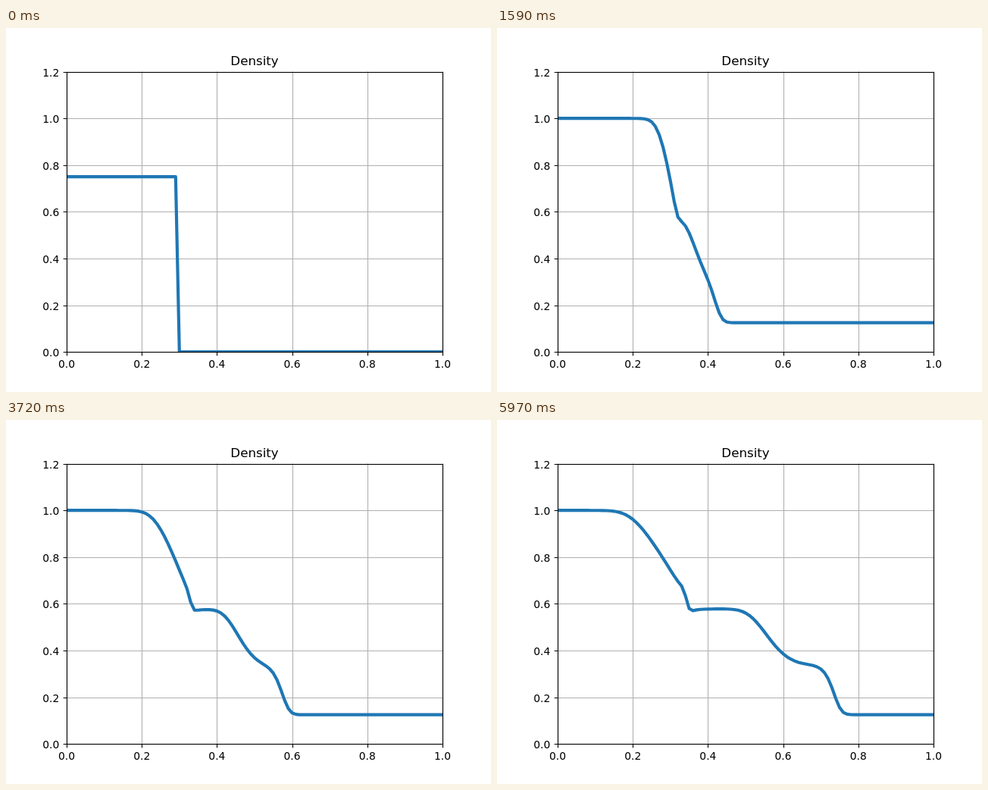
These frames come from a looping animation (640x480 px, 6000 ms). An HTML page:

```html
<!DOCTYPE html>
<html lang="en">
<head>
<meta charset="utf-8">
<title>Density</title>
<style>
  html, body { margin: 0; width: 100%; height: 100%; overflow: hidden; background: #fff; }
  svg { display: block; width: 640px; height: 480px; }
  text { font: 13.889px "DejaVu Sans", sans-serif; fill: #000; }
  #title { font-size: 16.667px; text-anchor: middle; }
</style>
</head>
<body>
<svg viewBox="0 0 640 480">
  <defs><clipPath id="area"><rect x="80" y="57.6" width="496" height="369.6"/></clipPath></defs>
  <rect width="640" height="480" fill="#fff"/>
  <path id="grid" fill="none" stroke="#b0b0b0" stroke-width="1.11"/>
  <path id="ticks" fill="none" stroke="#000" stroke-width="1.11"/>
  <path id="curve" fill="none" stroke="#1f77b4" stroke-width="4.167"
        stroke-linejoin="round" stroke-linecap="square" clip-path="url(#area)"/>
  <rect x="80.5" y="58.5" width="496" height="369" fill="none" stroke="#000" stroke-width="1.11"/>
  <g id="labels"></g>
  <text id="title" x="328" y="49">Density</text>
</svg>
<script>
const FRAMES = 200, FRAME_MS = 30;
const CELLS = 101, DX = 0.01, DT = 0.001, GAMMA = 1.4;
const byId = id => document.getElementById(id);
const px = x => 80 + 496 * x;
const py = y => 427.2 - 308 * y;
const snap = v => Math.floor(v + 0.5) + 0.5;

function drawAxes() {
  let grid = '', ticks = '', labels = '';
  for (let i = 0; i <= 6; i++) {
    const v = i / 5, y = snap(py(v));
    grid += `M80 ${y}H576`;
    ticks += `M80.5 ${y}h-4.86`;
    labels += `<text x="70.3" y="${y + 5}" text-anchor="end">${v.toFixed(1)}</text>`;
    if (i > 5) continue;
    const x = snap(px(v));
    grid += `M${x} 57.6V427.2`;
    ticks += `M${x} 427.5v4.86`;
    labels += `<text x="${px(v)}" y="448" text-anchor="middle">${v.toFixed(1)}</text>`;
  }
  byId('grid').setAttribute('d', grid);
  byId('ticks').setAttribute('d', ticks);
  byId('labels').innerHTML = labels;
}

// Shock tube: conserved state is [density, momentum, energy].
const conserved = (rho, u, p) => [rho, rho * u, p / (GAMMA - 1) + rho * u * u / 2];

function describe(state) {
  const [rho, mom, energy] = state;
  const u = mom / rho;
  const p = (GAMMA - 1) * (energy - mom * u / 2);
  const a = Math.sqrt(GAMMA * p / rho);
  return { state, flux: [mom, mom * u + p, u * (energy + p)], slow: u - a, fast: u + a };
}

// Two-wave flux, applied everywhere, also where both waves run the same way.
function faceFlux(l, r) {
  const sl = Math.min(l.slow, r.slow), sr = Math.max(l.fast, r.fast);
  return l.flux.map((f, k) =>
    (sr * f - sl * r.flux[k] + sl * sr * (r.state[k] - l.state[k])) / (sr - sl));
}

function advance(cells) {
  const info = cells.map(describe);
  const faces = info.slice(1).map((r, i) => faceFlux(info[i], r));
  return cells.map((c, i) => i === 0 || i === CELLS - 1 ? c
    : c.map((v, k) => v - DT / DX * (faces[i][k] - faces[i - 1][k])));
}

function buildCurves() {
  const toPath = values =>
    'M' + values.map((v, i) => px(i * DX).toFixed(2) + ' ' + py(v).toFixed(2)).join('L');
  let cells = Array.from({ length: CELLS }, (_, i) =>
    i < 30 ? conserved(1, 0.75, 1) : conserved(0.125, 0, 0.1));
  // The opening picture shows the initial velocity.
  const paths = [toPath(cells.map(c => c[1] / c[0]))];
  while (paths.length < FRAMES) {
    cells = advance(cells);
    paths.push(toPath(cells.map(c => c[0])));
  }
  return paths;
}

drawAxes();
const curves = buildCurves(), curve = byId('curve');
const start = performance.now();
let shown = -1;

function render(now) {
  const frame = Math.floor(Math.max(0, now - start) / FRAME_MS) % FRAMES;
  if (frame !== shown) curve.setAttribute('d', curves[shown = frame]);
  requestAnimationFrame(render);
}
render(start);
</script>
</body>
</html>
```
